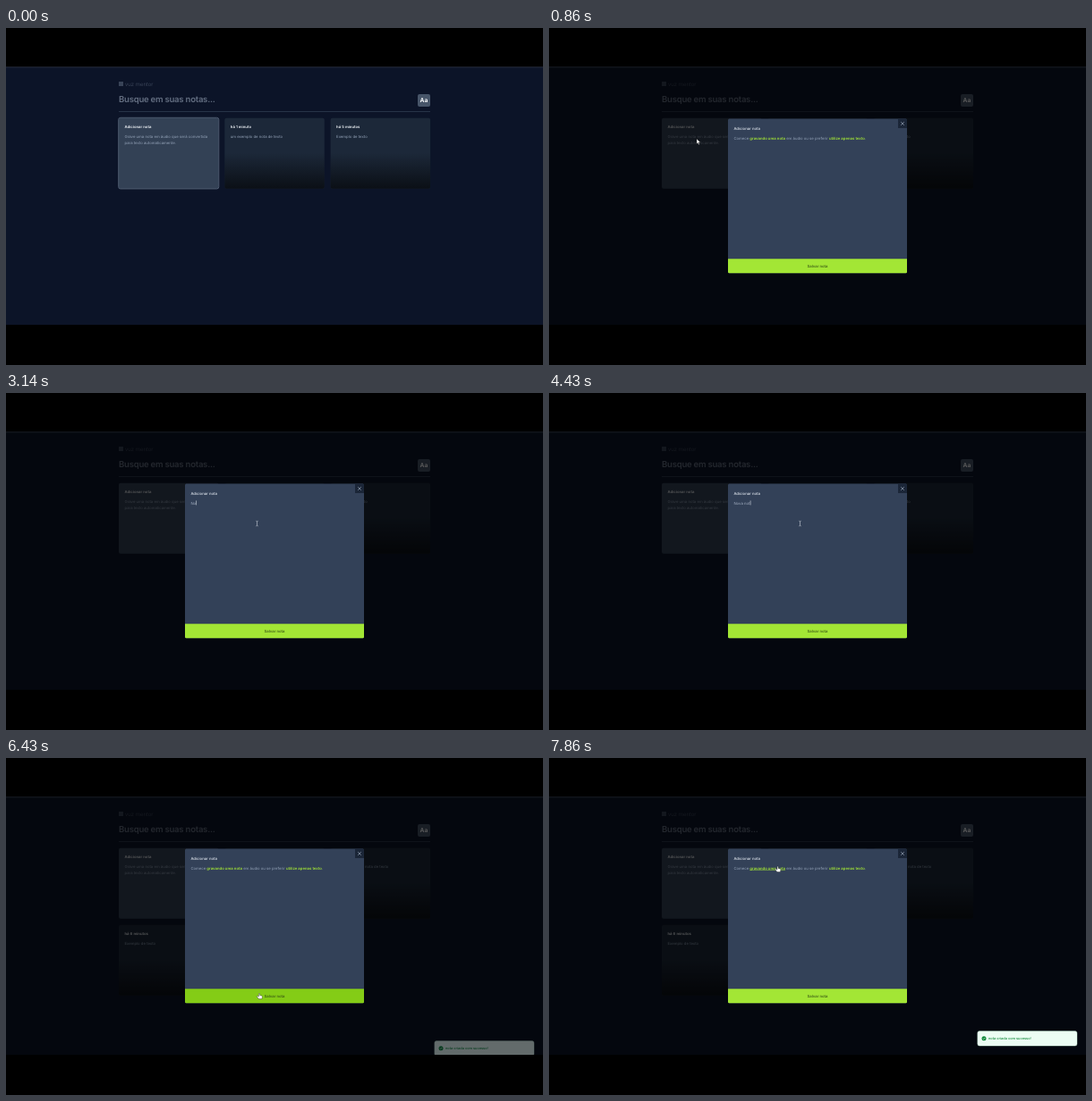
These frames come from a looping animation (600x377 px, 8 s). An HTML page:

```html
<!DOCTYPE html>
<html lang="pt-BR">
<head>
<meta charset="utf-8">
<title>Notas</title>
<style>
html, body { margin: 0; width: 100%; height: 100%; overflow: hidden; background: #000; }
svg { display: block; width: 100vw; height: 100vh; }
text { font: 400 4.25px Inter, sans-serif; fill: #94a3b8; text-rendering: geometricPrecision; white-space: pre; }
.title { font-weight: 500; fill: #e2e8f0; }
.card-title { font-weight: 600; fill: #f1f5f9; }
.link { font-weight: 600; fill: #a3e635; }
</style>
</head>
<body>
<svg viewBox="0 0 600 377">
  <defs>
    <linearGradient id="fade" x1="0" y1="0" x2="0" y2="1">
      <stop offset="0" stop-color="#05070a" stop-opacity="0"/>
      <stop offset="1" stop-color="#05070a" stop-opacity=".75"/>
    </linearGradient>
    <clipPath id="view"><rect y="43.5" width="600" height="288.5"/></clipPath>
  </defs>
  <rect width="600" height="377"/>
  <g clip-path="url(#view)">
    <rect y="43" width="600" height="290" fill="#0c1428"/>

    <rect x="126" y="60" width="5" height="5" fill="#384357"/>
    <text x="133" y="64.6" style="font-size:6px;font-weight:300;fill:#465064">vuz mentor</text>
    <text x="126" y="83.3" style="font-size:9.55px;font-weight:600;letter-spacing:-.025em;fill:#646f82">Busque em suas notas...</text>
    <rect x="460" y="74" width="14" height="14" rx="2" fill="#475569"/>
    <text x="467" y="83.4" text-anchor="middle" style="font-size:6.6px;font-weight:700;fill:#f8fafc">Aa</text>
    <rect x="126" y="93.2" width="348" height=".7" fill="#334155"/>

    <rect x="126" y="100.7" width="111.5" height="79" rx="2" fill="#334155"/>
    <rect id="ring" x="125.7" y="100.3" width="112.1" height="79.6" rx="2.2" fill="none" stroke="#566479" stroke-width=".9"/>
    <text class="card-title" x="132.5" y="111.8">Adicionar nota</text>
    <text x="132.5" y="122.5">Grave uma nota em áudio que será convertida</text>
    <text x="132.5" y="129.9">para texto automaticamente.</text>
    <g id="notes"></g>

    <rect id="shade" y="43" width="600" height="290" opacity=".65"/>
    <rect id="edge" y="43.2" width="600" height="1" fill="#353c4c"/>

    <g id="modal">
      <rect x="200" y="101.6" width="200" height="172.7" rx="1.5" fill="#334158"/>
      <path d="M390 101.6h8.500a1.500 1.500 0 0 1 1.500 1.500v8.800h-10z" fill="#1b2638"/>
      <path d="M393.200 105.100l3.600 3.600m0-3.600l-3.600 3.600" stroke="#a8b4c6" stroke-width=".65"/>
      <text class="title" x="206.400" y="113.500">Adicionar nota</text>
      <text id="prompt" x="206.400" y="124.500">Comece <tspan class="link" id="record">gravando uma nota</tspan> em áudio ou se preferir <tspan class="link" id="write">utilize apenas texto</tspan>.</text>
      <text id="typed" x="206.400" y="124.500" style="fill:#a3afc2"></text>
      <rect id="caret" y="120.400" width=".55" height="5" fill="#e2e8f0"/>
      <path id="save" d="M200 258.200h200v14.600a1.500 1.500 0 0 1-1.500 1.500h-197a1.500 1.500 0 0 1-1.500-1.500z"/>
      <text x="300" y="267.700" text-anchor="middle" style="font-weight:500;fill:#365314">Salvar nota</text>
    </g>

    <g id="toast">
      <rect x="478.800" y="305.500" width="111.200" height="16.500" rx="2.200" fill="#ecfdf3" stroke="#bfead0" stroke-width=".4"/>
      <circle cx="486" cy="313.700" r="2.500" fill="#148a3c"/>
      <path d="M484.900 313.800l.8.800 1.500-1.700" fill="none" stroke="#ecfdf3" stroke-width=".6"/>
      <text x="491" y="315.200" style="font-size:3.900px;font-weight:500;fill:#148a3c">nota criada com sucesso!</text>
    </g>

    <g id="cursor">
      <path id="arrow" d="M0 0v5.600l1.300-1.200.9 2 1-.5-.9-1.900h1.800z" fill="#fff" stroke="#111" stroke-width=".35"/>
      <path id="beam" d="M-1.200-2.800q1 0 1.200.5q.2-.5 1.200-.5M0-2.300v4.600M-1.200 2.800q1 0 1.200-.5q.2.5 1.200.5" fill="none" stroke="#d5dae2" stroke-width=".55"/>
      <path id="hand" d="M-.6-1.900q.6-.8 1.200 0v1.800l2.100.5q.8.3.7 1.100l-.5 2.500h-3.500l-2.100-2.700q-.2-.8.700-.7l1.400.8z" fill="#fff" stroke="#111" stroke-width=".35"/>
    </g>
  </g>
</svg>
<script>
const LOOP = 8000, FPS = 7;
const OPEN = 860, WRITE = 2290, SAVE = 6430;
const el = id => document.getElementById(id);
const show = (id, on) => el(id).setAttribute('display', on ? 'inline' : 'none');
const set = (id, name, value) => el(id).setAttribute(name, value);

// time, x, y
const route = [
  [140, 205, 325], [570, 166, 126], [710, 165, 124], [860, 165, 124],
  [1140, 222, 148], [1860, 334, 125], [2290, 334, 125],
  [2710, 280.500, 146], [4860, 280.500, 146], [5570, 285, 256.500],
  [5860, 284, 264], [6140, 283, 265.500], [6570, 283, 265.500],
  [7430, 254, 114], [7860, 255.500, 123.500]
];
const keys = [
  [3000, 'N'], [3140, 'No'], [3860, 'Nov'], [4000, 'Nova'],
  [4290, 'Nova n'], [4430, 'Nova not'], [4570, 'Nova nota']
];

const smooth = p => p * p * (3 - 2 * p);
const easeOut = p => 1 - (1 - p) ** 2;
const clamp = p => Math.max(0, Math.min(1, p));

function pointAt(t) {
  const i = route.findIndex(stop => stop[0] >= t);
  if (i < 0) return route[route.length - 1].slice(1);
  if (i === 0) return route[0].slice(1);
  const [t0, x0, y0] = route[i - 1], [t1, x1, y1] = route[i];
  const p = smooth((t - t0) / (t1 - t0));
  return [x0 + (x1 - x0) * p, y0 + (y1 - y0) * p];
}

function note(col, row, title, body) {
  const x = 126 + col * 118.300, y = 100.700 + row * 86;
  return `<rect x="${x}" y="${y}" width="111.500" height="79" rx="2" fill="#1c2839"/>
    <rect x="${x}" y="${y + 39}" width="111.500" height="40" rx="2" fill="url(#fade)"/>
    <text class="card-title" x="${x + 6.500}" y="${y + 11.100}">${title}</text>
    <text x="${x + 6.500}" y="${y + 21.800}">${body}</text>`;
}

const sample = 'um exemplo de nota de texto', plain = 'Exemplo de texto';
const before = note(1, 0, 'há 1 minuto', sample) + note(2, 0, 'há 5 minutos', plain);
const after = note(1, 0, 'há menos de um minuto', 'Nova nota') +
  note(2, 0, 'há 1 minuto', sample) + note(0, 1, 'há 6 minutos', plain);
let saved = null;

function drawNotes(done) {
  if (saved === done) return;
  saved = done;
  el('notes').innerHTML = done ? after : before;
}

function drawText(t, editing) {
  show('prompt', !editing);
  show('typed', editing);
  const typed = keys.filter(key => key[0] <= t).pop() || [WRITE, ''];
  el('typed').textContent = typed[1];
  const blinkOn = (t - typed[0]) % 860 < 425;
  show('caret', editing && blinkOn);
  if (editing) set('caret', 'x', 206.700 + (typed[1] ? el('typed').getComputedTextLength() : 0));
}

function drawCursor(t, open, editing) {
  const [x, y] = pointAt(t);
  const onSave = open && y > 258.200;
  const onLine = open && !editing && y > 119.500 && y < 127;
  const onRecord = onLine && x > 224 && x < 266;
  const onWrite = onLine && x > 315 && x < 357;
  const hand = onSave || onRecord || onWrite;
  const beam = editing && y < 250;
  set('cursor', 'transform', `translate(${x} ${y})`);
  show('cursor', t >= 140);
  show('hand', hand);
  show('beam', beam);
  show('arrow', !hand && !beam);
  set('save', 'fill', onSave ? '#84cc16' : '#a3e635');
  set('record', 'text-decoration', onRecord ? 'underline' : 'none');
  set('write', 'text-decoration', onWrite ? 'underline' : 'none');
}

function drawToast(t) {
  const p = easeOut(clamp((t - SAVE + 95) / 430));
  show('toast', t >= SAVE);
  set('toast', 'transform', `translate(0 ${(1 - p) * 18.500})`);
  set('toast', 'opacity', p);
}

function draw(time) {
  const t = Math.floor((time % LOOP + 5) * FPS / 1000) * 1000 / FPS + 5;
  const open = t >= OPEN, editing = t >= WRITE && t < SAVE;
  drawNotes(t >= SAVE);
  show('shade', open);
  show('modal', open);
  show('ring', !open);
  set('edge', 'fill', open ? '#25292f' : '#353c4c');
  drawText(t, editing);
  drawCursor(t, open, editing);
  drawToast(t);
}

const start = performance.now();
function frame() {
  draw(performance.now() - start);
  requestAnimationFrame(frame);
}
frame();
</script>
</body>
</html>
```
